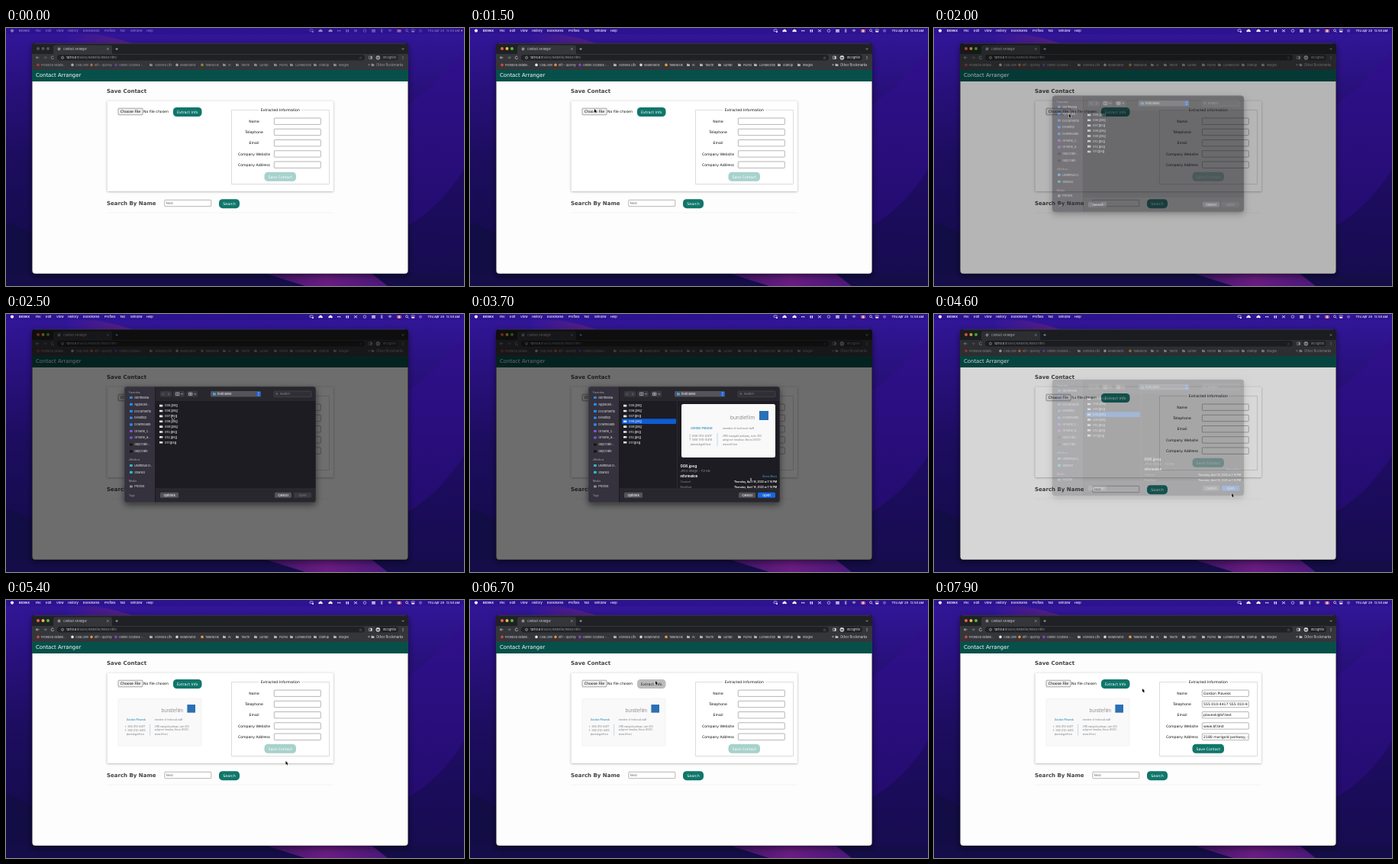
These frames come from a looping animation (600 by 338 pixels, 8000 ms). An HTML page with a canvas:

```html
<!DOCTYPE html>
<html lang="en">
<head>
<meta charset="utf-8">
<title>Contact Arranger</title>
<style>
  html, body { margin: 0; width: 100%; height: 100%; overflow: hidden; background: #1a0f4a; }
  canvas { display: block; width: 600px; height: 338px; }
</style>
</head>
<body>
<canvas id="stage"></canvas>
<script>
const W = 600, H = 338, LOOP = 8000, STEP = 100;
const UI = 'Inter, "Noto Sans", sans-serif';
const PAGE = '"DejaVu Sans", sans-serif';
const GREEN = '#10766a';
const canvas = document.getElementById('stage');
const ctx = canvas.getContext('2d');
const dpr = window.devicePixelRatio || 1;
canvas.width = W * dpr;
canvas.height = H * dpr;

const clamp = v => Math.max(0, Math.min(1, v));
const ramp = (t, a, b) => clamp((t - a) / (b - a));
const ease = u => u * u * (3 - 2 * u);

function box(x, y, w, h, fill, r = 0, stroke = null, lw = 0.6) {
  ctx.beginPath();
  ctx.roundRect(x, y, w, h, r);
  if (fill) { ctx.fillStyle = fill; ctx.fill(); }
  if (stroke) { ctx.strokeStyle = stroke; ctx.lineWidth = lw; ctx.stroke(); }
}

function dot(x, y, r, fill) {
  ctx.beginPath();
  ctx.arc(x, y, r, 0, Math.PI * 2);
  ctx.fillStyle = fill;
  ctx.fill();
}

function ring(x, y, r, color, lw = 0.6, a = 0, b = Math.PI * 2) {
  ctx.beginPath();
  ctx.arc(x, y, r, a, b);
  ctx.strokeStyle = color;
  ctx.lineWidth = lw;
  ctx.stroke();
}

function line(color, lw, ...p) {
  ctx.beginPath();
  for (let i = 0; i < p.length; i += 2) ctx.lineTo(p[i], p[i + 1]);
  ctx.strokeStyle = color;
  ctx.lineWidth = lw;
  ctx.stroke();
}

function text(s, x, y, size, color, { font = UI, weight = 400, align = 'left', style = '' } = {}) {
  ctx.font = `${style} ${weight} ${size}px ${font}`;
  ctx.fillStyle = color;
  ctx.textAlign = align;
  ctx.textBaseline = 'alphabetic';
  ctx.fillText(s, x, y + size * 0.36);
}

function gradient(x0, y0, x1, y1, stops) {
  const g = ctx.createLinearGradient(x0, y0, x1, y1);
  stops.forEach((c, i) => g.addColorStop(i / (stops.length - 1), c));
  return g;
}

// A closed shape with one curved upper edge.
function wave(fill, x0, y0, cx, cy, x1, y1, bottom = H) {
  ctx.beginPath();
  ctx.moveTo(x0, y0);
  ctx.quadraticCurveTo(cx, cy, x1, y1);
  ctx.lineTo(x1, bottom);
  ctx.lineTo(x0, bottom);
  ctx.fillStyle = fill;
  ctx.fill();
}

function wallpaper() {
  box(0, 0, W, H, gradient(0, 0, 0, H, ['#32169a', '#28107a', '#1c0d5e', '#170c52', '#120c44']));
  wave(gradient(80, 0, 170, 0, ['#32169a', '#5a1f80']), 80, 8, 120, 4, 165, 20, 20);
  wave(gradient(0, 30, 0, 250, ['#30108c', '#240c70']), 520, 105, 565, 75, 600, 30);
  wave(gradient(0, 190, 0, H, ['#1e0c62', '#160c4e']), 520, 262, 565, 240, 600, 185);
  wave('#120d44', 0, 255, 30, 262, 60, 290);
  box(0, 322, W, 16, '#140d48');
  ctx.beginPath();
  [[338, 321], [478, 321], [500, H], [392, H]].forEach(p => ctx.lineTo(...p));
  ctx.fillStyle = gradient(338, 0, 500, 0, ['#3c1468', '#6a1c82', '#4a1878']);
  ctx.fill();
}

function cloud(x, y) {
  dot(x - 1.4, y + 0.4, 1.3, '#eee');
  dot(x + 0.2, y - 0.3, 1.7, '#eee');
  dot(x + 1.7, y + 0.5, 1.2, '#eee');
}

function menuBar(dim) {
  box(0, 0, W, 8, 'rgba(40,16,136,0.5)');
  ctx.globalAlpha = dim;
  const c = '#f2f0f8', y = 3.6;
  dot(8, y, 2.1, c);
  text('Brovex', 17, y, 4.1, c, { weight: 700 });
  [['File', 39], ['Edit', 52], ['View', 66], ['History', 81], ['Bookmarks', 101],
   ['Profiles', 129], ['Tab', 149], ['Window', 163], ['Help', 184]]
    .forEach(([s, x]) => text(s, x, y, 4, c, { weight: 500 }));
  box(398, 1.8, 4, 2.6, null, 0.6, c);
  dot(402, 5, 1, c);
  cloud(412, y);
  cloud(425, y);
  dot(435, y, 0.9, c); dot(437.5, y, 0.9, c);
  box(445.5, 2, 1.2, 3.4, c); box(447.8, 2, 1.2, 3.4, c);
  line(c, 0.8, 456, 2, 458, 3.6, 456, 5.2);
  line(c, 0.8, 460, 2, 458, 3.6, 460, 5.2);
  ring(470, y, 1.8, c);
  box(479, 2, 5, 1.5, c, 0.4); box(479, 4.2, 5, 1.2, c, 0.4);
  line(c, 0.5, 490.8, 2.4, 493.4, 4.8, 492, 6, 492, 1.2, 493.4, 2.4, 490.8, 4.8);
  [1.1, 2.2, 3.2].forEach(r => ring(503, 5.4, r, c, 0.6, -2.35, -0.8));
  box(512.5, 2, 5, 3.4, '#f4f0f0', 0.4);
  box(512.5, 2, 1.3, 3.4, '#d8323a'); box(516.2, 2, 1.3, 3.4, '#d8323a');
  dot(515, y, 0.7, '#d8323a');
  ring(525, 3.2, 1.5, c); line(c, 0.7, 526, 4.3, 527.4, 5.7);
  box(531, 1.8, 4.4, 1.5, null, 0.7, c, 0.5); box(531, 4, 4.4, 1.5, c, 0.7);
  dot(543, y, 2.2, '#6f4fb8');
  text('Thu Apr 28', 552.5, y, 4, c, { weight: 500 });
  text('12:58 AM', 594.5, y, 4, c, { weight: 500, align: 'right' });
  ctx.globalAlpha = 1;
  if (dim < 1) dot(597, y, 1, '#e8a23a');
}

function folder(x, y, color = '#b4b6ba') {
  box(x - 1.9, y - 1.7, 1.8, 1.2, color, 0.3);
  box(x - 1.9, y - 1.2, 3.8, 2.9, color, 0.4);
}

function chrome(dim, starting) {
  const c = '#d5d6d9';
  box(34, 20, 493, 15, '#202124', [4, 4, 0, 0]);
  box(62, 22.5, 77, 13, '#35363a', [2.5, 2.5, 0, 0]);
  box(34, 34, 493, 21, '#35363a');
  ['#fc5b57', '#e5bf3c', '#57c038'].forEach((f, i) => dot(42 + i * 6.5, 27, 2, starting ? '#55565a' : f));
  dot(69.5, 27.5, 1.9, '#9a9ca1');
  line('#35363a', 0.5, 68.2, 26.5, 70.8, 28.6);
  text('Contact Arranger', 75, 27.5, 3.8, c);
  line(c, 0.5, 132.2, 26.3, 134.6, 28.7);
  line(c, 0.5, 134.6, 26.3, 132.2, 28.7);
  line(c, 0.6, 143.4, 27.5, 146.8, 27.5);
  line(c, 0.6, 145.1, 25.8, 145.1, 29.2);
  line(c, 0.7, 518.5, 26.8, 520, 28.2, 521.5, 26.8);

  box(67, 35, 403, 7.6, '#202124', 3.8);
  ring(74, 38.8, 1.6, c, 0.5); line(c, 0.5, 74, 38.6, 74, 39.7);
  text('127.0.0.1', 79, 38.8, 4.1, '#f1f1f2', { weight: 500 });
  const host = ctx.measureText('127.0.0.1').width;
  text(':5500/Website/index.html', 79 + host, 38.8, 4.1, '#96999e');

  ctx.globalAlpha = dim;
  line(c, 0.7, 43.4, 38.8, 39.4, 38.8); line(c, 0.7, 41.2, 37, 39.4, 38.8, 41.2, 40.6);
  line('#85878b', 0.7, 49.2, 38.8, 53.2, 38.8); line('#85878b', 0.7, 51.4, 37, 53.2, 38.8, 51.4, 40.6);
  ring(61, 38.8, 1.8, c, 0.7, 0.3, 5.6);
  text('☆', 464.5, 38.8, 5, c, { font: '"DejaVu Sans", sans-serif', align: 'center' });
  box(475.4, 37, 4, 3.5, null, 0.5, c, 0.6); box(477.6, 37, 1.8, 3.5, c);
  box(483, 35, 31, 7.6, '#202124', 3.8);
  dot(487.3, 38.8, 2.9, '#d9dadd');
  box(485.5, 38.3, 3.6, 0.7, '#35363a');
  dot(486.4, 39.8, 0.7, '#35363a'); dot(488.2, 39.8, 0.7, '#35363a');
  text('Incognito', 494, 38.8, 3.9, '#eee');
  [-1.5, 0, 1.5].forEach(d => dot(520, 38.8 + d, 0.5, c));

  const y = 48.4;
  [['Frendora details...', 42, '#e0453a'], ['CodLoom', 87, '#e8e8ea'], ['Infl - Quorvy', 112, '#f28a3c'],
   ['Online Courses -...', 144, '#8b3fd6'], ['eMarlowick', 224, '#d8d8da'], ['TaskNook', 257, '#e0a13a']]
    .forEach(([s, x, f]) => { dot(x, y, 1.8, f); text(s, x + 4, y, 3.8, c); });
  [['Velmora Life', 190], ['Al', 286], ['Tavrin', 303], ['QuTab', 327], ['Plume', 353],
   ['Lumascribe', 374], ['Startup', 405], ['Images', 431]]
    .forEach(([s, x]) => { folder(x, y); text(s, x + 5, y, 3.8, c); });
  text('»', 475.5, y, 5, c, { align: 'center' });
  folder(480.5, y);
  text('Other Bookmarks', 485, y, 4.3, c);
  ctx.globalAlpha = 1;
}

function button(label, x, y, w, h, fill = GREEN, color = '#fff') {
  box(x, y, w, h, fill, 4.6);
  text(label, x + w / 2, y + h / 2, 4.75, color, { font: PAGE, align: 'center' });
}

function field(x, y, w, value, color = '#111') {
  box(x, y, w, 8.4, '#fff', 0.8, '#858585', 0.6);
  if (!value) return;
  ctx.save();
  ctx.beginPath();
  ctx.rect(x + 1, y, w - 2, 9);
  ctx.clip();
  text(value, x + 1.8, y + 4.3, 4.6, color, { font: PAGE });
  ctx.restore();
}

function businessCard(x, y, k) {
  ctx.save();
  ctx.translate(x, y);
  ctx.scale(k, k);
  box(0, 0, 123, 70, '#f9f9f9', 2.5);
  text('bundlefilm', 64, 17.5, 6.6, '#6c7076', { weight: 300 });
  box(102, 9, 12, 12, '#2c70b4');
  text('Gordon Plavesk', 12, 31.5, 3.8, '#2787b8', { style: 'italic', weight: 500 });
  const c = '#787c80';
  text('member of technical staff', 54, 31.5, 3.4, c);
  line('#8ab6cc', 0.5, 47, 38, 47, 55);
  text('t  555 010-4417', 10.5, 42, 4, c);
  text('f  555 010-4410', 10.5, 47, 4, c);
  text('plavesk@bf.test', 12, 52.7, 3.5, c);
  text('2180 marigold parkway, suite 300', 54, 41.5, 3.2, c);
  text('ashgrove meadow, illinois 00000', 54, 46.7, 3.2, c);
  text('www.bf.test', 54, 52.7, 3.4, c);
  ctx.restore();
}

function page(t) {
  const done = t >= 7300;
  box(34.5, 55, 492, 266.7, '#fdfdfd', [0, 0, 4, 4]);
  box(34, 55, 493, 15, '#07504a');
  text('Contact Arranger', 39, 62, 6.9, '#fff', { font: PAGE });
  text('Save Contact', 132, 82, 7, '#444', { font: PAGE, weight: 700 });

  ctx.save();
  ctx.shadowColor = 'rgba(0,0,0,0.36)';
  ctx.shadowBlur = 2.5 * dpr;
  ctx.shadowOffsetY = 0.6 * dpr;
  box(132.5, 95.5, 296.5, 118.5, '#fff', 1);
  ctx.restore();

  box(147, 105.2, 32, 8.6, '#efefef', 0.8, '#6f6f6f', 0.6);
  text('Choose File', 163, 109.6, 4.65, '#000', { font: PAGE, align: 'center' });
  text('No file chosen', 180, 109.6, 4.65, '#111', { font: PAGE });
  const hover = t >= 6200 && t < 7500;
  button('Extract Info', 219, 104, 37.5, 12, hover ? '#bcbcbc' : GREEN, hover ? '#222' : '#fff');
  if (t >= 4900) {
    businessCard(147, 129, 0.886);
    box(147, 129, 109, 62, null, 1, '#e6e6e6', 0.4);
  }

  box(295.5, 107.5, 128, 97, null, 0, '#c4c4c4', 0.6);
  box(331.5, 105, 55.5, 5, '#fff');
  text('Extracted Information', 359.3, 107.8, 4.7, '#111', { font: PAGE, align: 'center' });
  [['Name', 'Gordon Plavesk'],
   ['Telephone', '555 010-4417 555 010-4410'],
   ['Email', 'plavesk@bf.test'],
   ['Company Website', 'www.bf.test'],
   ['Company Address', '2180 marigold parkway, suite 300']
  ].forEach(([label, value], i) => {
    const y = 122.2 + i * 14.25;
    text(label, 325, y, 4.65, '#111', { font: PAGE, align: 'center' });
    field(351.3, y - 4.2, 61, done && value);
  });
  button('Save Contact', 338.5, 188.8, 41.5, 12, done ? GREEN : '#a7d2cc');

  text('Search By Name', 132, 229, 7, '#444', { font: PAGE, weight: 700 });
  field(207.8, 225.3, 61, 'Ned', '#757575');
  button('Search', 279, 224.2, 27, 12);
  line('#f0f0f0', 0.8, 132, 242, 429, 242);
}

function dialog(t) {
  const picked = t >= 2900, closing = t >= 4380;
  const white = '#e6e6ea', gray = '#8d8d94', blue = '#2a8cf0';
  ctx.save();
  ctx.shadowColor = 'rgba(0,0,0,0.55)';
  ctx.shadowBlur = 9 * dpr;
  ctx.shadowOffsetY = 3 * dpr;
  box(155, 95, 251, 152, '#1d1c22', 4);
  ctx.restore();
  box(195, 95, 211, 19, '#28272d', [0, 4, 0, 0]);
  box(155, 95, 40.5, 152, '#35323d', [4, 0, 0, 4]);
  box(195, 229, 211, 18, '#28272d', [0, 0, 4, 0]);
  line('#0f0f12', 0.5, 195.5, 95, 195.5, 247);
  line('#3c3b42', 0.5, 196, 229, 406, 229);
  box(155, 95, 251, 152, null, 4, '#5a5960', 0.5);

  [['Favorites', 103], ['uNimbus', 191], ['Media', 219], ['Tags', 238]]
    .forEach(([s, y]) => text(s, 161, y, 3.3, gray, { weight: 600 }));
  [['dorimelka', 109.5], ['Applicati...', 118.4], ['Documents', 127.3], ['Desktop', 136], ['Downloads', 144.8],
   ['Orvane_c...', 153.5], ['Orvane_a...', 162], ['SkyCrate...', 171], ['SkyCrate', 180],
   ['uNimbus D...', 198.5], ['Shared', 207.4], ['Photos', 226]]
    .forEach(([s, y], i) => {
      const c = i === 5 || i === 6 ? '#7a55e0' : i === 7 || i === 8 ? '#121216' : i === 11 ? gray : i > 8 ? '#35b6d8' : blue;
      box(162, y - 1.6, 3.8, 3.2, c, 0.8);
      text(s, 168.3, y, 4, white);
    });

  box(202, 101, 15, 7.6, '#3b3a41', 1.5);
  line(gray, 0.6, 206.4, 103.2, 205, 104.8, 206.4, 106.4);
  line(gray, 0.6, 212.6, 103.2, 214, 104.8, 212.6, 106.4);
  [219.5, 236.5].forEach((x, i) => {
    box(x, 101, 14.5, 7.6, '#3b3a41', 1.5);
    box(x + 3, 103, 4.4, 3.6, null, 0.4, white, 0.5);
    line(white, 0.5, x + 5.2, 103, x + 5.2, 106.6);
    if (i) line(white, 0.5, x + 3, 104.8, x + 7.4, 104.8);
    line(white, 0.6, x + 10, 104.2, x + 11.2, 105.4, x + 12.4, 104.2);
  });
  box(268, 101, 66, 7.6, '#55545b', 1.5);
  folder(273, 104.8, '#3fa9e8');
  text('testcases', 277, 104.8, 4.1, '#fff');
  box(328.6, 101.7, 4.6, 6.2, '#1767e0', 1.1);
  line('#fff', 0.5, 329.8, 104, 330.9, 102.9, 332, 104);
  line('#fff', 0.5, 329.8, 105.6, 330.9, 106.7, 332, 105.6);
  box(351, 101, 49, 7.6, '#302f36', 1.5, '#55545b', 0.5);
  ring(354.6, 104.4, 1.2, gray, 0.5); line(gray, 0.5, 355.5, 105.3, 356.6, 106.4);
  text('Search', 358.5, 104.8, 4, gray);

  if (picked) box(199, 137.3, 71, 6.7, '#0f5bd2', 1);
  ['005', '006', '007', '008', '009', '010', '012', '017'].forEach((n, i) => {
    const y = 120 + i * 6.87;
    box(201, y - 1.2, 4.4, 2.6, '#ececec', 0.3);
    box(203.8, y - 0.7, 1, 0.9, '#6d8fb5');
    text(n + '.jpeg', 208, y, 4, '#fff');
  });

  if (picked) {
    line('#3c3b42', 0.5, 271.5, 114, 271.5, 229);
    if (!closing) businessCard(277, 118, 1);
    text('008.jpeg', 275.5, 199, 5, '#fff', { weight: 600 });
    text('JPEG image - 112 KB', 275.5, 205.6, 4, gray);
    text('Information', 275.5, 213, 4, '#fff', { weight: 700 });
    text('Show More', 402, 213, 3.6, '#35aee0', { align: 'right' });
    ctx.save();
    ctx.beginPath();
    ctx.rect(272, 215, 134, 13.5);
    ctx.clip();
    [['Created', 220], ['Modified', 227]].forEach(([s, y]) => {
      text(s, 275.5, y, 3.5, gray);
      text('Thursday, April 14, 2022 at 7:14 PM', 402, y, 3.3, '#fff', { weight: 600, align: 'right' });
    });
    ctx.restore();
  }

  [['Options', 202, 24, '#55545b', '#fff'], ['Cancel', 352, 22, '#55545b', '#fff'],
   ['Open', 377, 23, picked ? '#1767e0' : '#3a3940', picked ? '#fff' : '#77767d']]
    .forEach(([s, x, w, f, c]) => {
      box(x, 233.8, w, 7, f, 1.5);
      text(s, x + w / 2, 237.3, 4.1, c, { weight: 500, align: 'center' });
    });
}

// time, x, y
const path = [
  [100, 260, 345], [1200, 163, 106], [1800, 163, 106], [2400, 216, 131], [2700, 222, 140],
  [3100, 224, 141], [3700, 368, 217], [4100, 390, 235], [4900, 390, 235], [5300, 370, 214],
  [6300, 243, 106], [7200, 243, 106], [7700, 273, 116], [8000, 273, 116]
];

function cursor(t) {
  let i = path.findIndex(p => p[0] > t);
  if (i < 1) i = 1;
  const [t0, x0, y0] = path[i - 1], [t1, x1, y1] = path[i];
  const u = ease(ramp(t, t0, t1));
  const x = x0 + (x1 - x0) * u, y = y0 + (y1 - y0) * u;
  if (t < 4400 && x > 340 && y > 195 && y < 228) {
    line('#fff', 1.4, x, y - 2.6, x, y + 2.6);
    line('#111', 0.7, x - 1.2, y - 2.8, x + 1.2, y - 2.8);
    line('#111', 0.7, x, y - 2.8, x, y + 2.8);
    line('#111', 0.7, x - 1.2, y + 2.8, x + 1.2, y + 2.8);
    return;
  }
  ctx.beginPath();
  [[0, 0], [0, 4.6], [1, 3.7], [1.8, 5.4], [2.6, 5], [1.9, 3.4], [3.2, 3.3]]
    .forEach(([a, b]) => ctx.lineTo(x + a, y + b));
  ctx.closePath();
  ctx.strokeStyle = '#fff';
  ctx.lineWidth = 0.8;
  ctx.stroke();
  ctx.fillStyle = '#000';
  ctx.fill();
}

function draw(t) {
  const starting = t < 500;
  const sheet = Math.min(ramp(t, 1850, 2150), 1 - ramp(t, 4380, 4680));
  ctx.setTransform(dpr, 0, 0, dpr, 0, 0);
  ctx.globalAlpha = 1;
  wallpaper();
  menuBar(starting ? 0.45 : 1);
  ctx.save();
  ctx.shadowColor = 'rgba(0,0,0,0.5)';
  ctx.shadowBlur = 8 * dpr;
  ctx.shadowOffsetY = 3 * dpr;
  box(34, 20, 493, 302, '#202124', 4);
  ctx.restore();
  chrome(starting || sheet > 0 ? 0.65 : 1, starting);
  page(t);
  if (sheet > 0) {
    box(34, 20, 493, 302, `rgba(0,0,0,${0.57 * sheet})`, 4);
    paintSheet(t, sheet);
  }
  line('rgba(150,150,160,0.4)', 0.5, 38, 20.2, 523, 20.2);
  cursor(t);
}

// The sheet is composed apart so that it fades as one layer.
const layer = document.createElement('canvas');
layer.width = canvas.width;
layer.height = canvas.height;

function paintSheet(t, alpha) {
  if (alpha >= 1) return dialog(t);
  const keep = layer.getContext('2d');
  keep.clearRect(0, 0, layer.width, layer.height);
  keep.drawImage(canvas, 0, 0);
  ctx.save();
  ctx.translate(0, -12.3 * (1 - alpha));
  dialog(t);
  ctx.restore();
  ctx.save();
  ctx.globalAlpha = 1 - alpha;
  ctx.drawImage(layer, 0, 0, W, H);
  ctx.restore();
}

const start = performance.now();
function tick() {
  const t = (performance.now() - start) % LOOP;
  draw(Math.floor(t / STEP) * STEP);
  requestAnimationFrame(tick);
}
tick();
</script>
</body>
</html>
```
